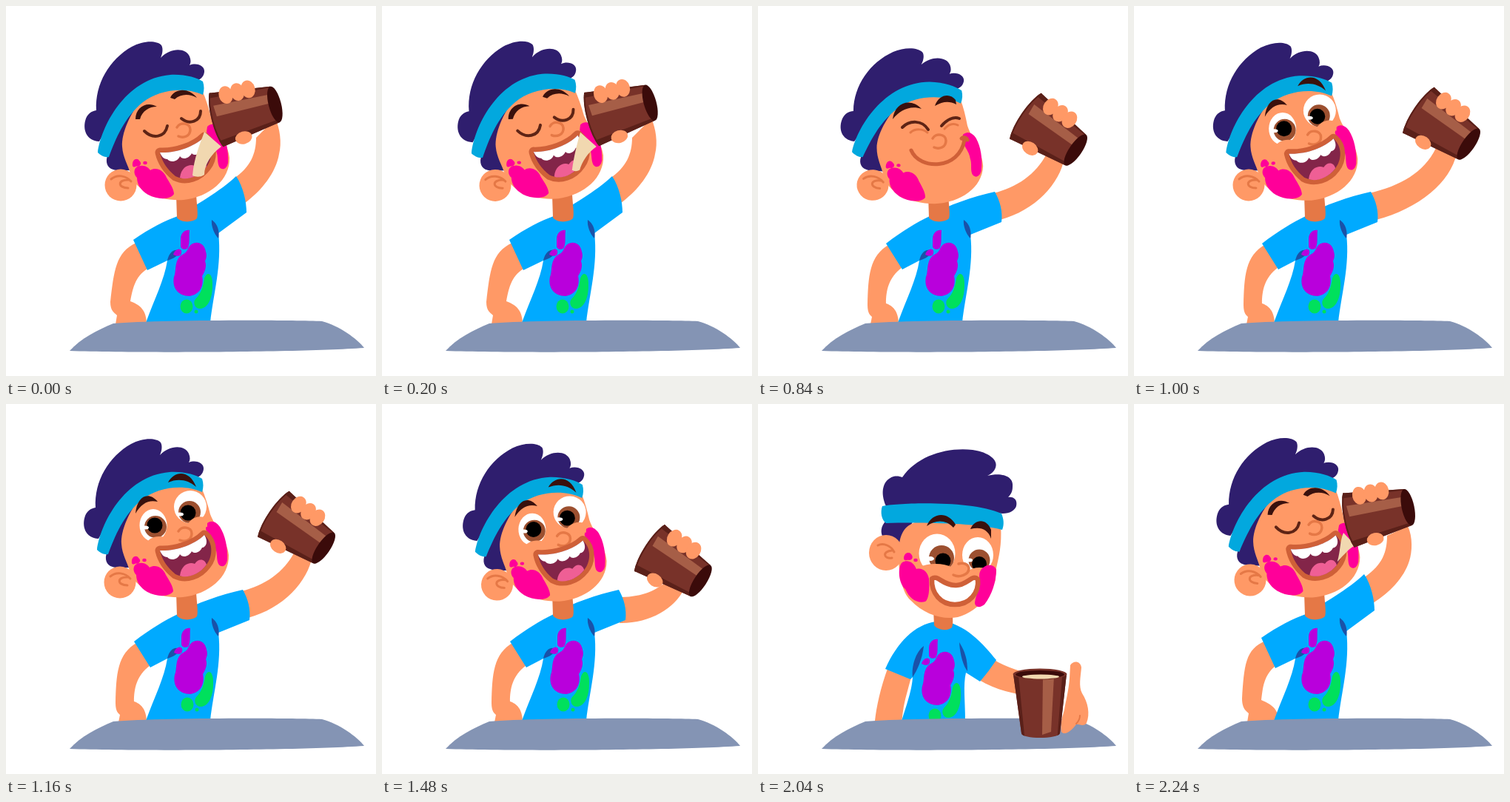
Animation, 500 px wide and 500 px high, one loop 2280 ms. Source, as an HTML page with a canvas:

```html
<!DOCTYPE html>
<html lang="en">
<head>
<meta charset="utf-8">
<title>Drinking boy</title>
<style>
html, body { margin: 0; width: 100%; height: 100%; overflow: hidden; background: #fff; }
canvas { display: block; width: 100vw; height: 100vh; }
</style>
</head>
<body>
<canvas id="stage"></canvas>
<script>
const LOOP = 2280;
const C = {
  skin: '#ff9966', shade: '#e57846', lip: '#cf6038', hair: '#2f1e6e', band: '#02a8de',
  shirt: '#00aaff', fold: '#1a52a8', purple: '#b900dc', green: '#00e05c', pink: '#ff0099',
  table: '#8494b4', cup: '#783229', cupLight: '#a65e47', cupDark: '#5a2019', hole: '#3b0b0a',
  milk: '#f1d8b0', brow: '#3a110d', lash: '#5e2415', iris: '#9c5030', mouth: '#832549', tongue: '#ef5f95'
};

const canvas = document.getElementById('stage');
const ctx = canvas.getContext('2d');
const dpr = window.devicePixelRatio || 1;
canvas.width = canvas.height = 500 * dpr;

function fill(color, d) {
  ctx.fillStyle = color;
  ctx.fill(new Path2D(d));
}
function line(color, width, d) {
  ctx.strokeStyle = color;
  ctx.lineWidth = width;
  ctx.lineCap = ctx.lineJoin = 'round';
  ctx.stroke(new Path2D(d));
}
function dot(color, x, y, rx, ry = rx) {
  ctx.fillStyle = color;
  ctx.beginPath();
  ctx.ellipse(x, y, rx, ry, 0, 0, Math.PI * 2);
  ctx.fill();
}
function local(draw) {
  ctx.save();
  draw();
  ctx.restore();
}

// Body poses. Paths of one kind share their structure, so they can be blended.
const drink = {
  tilt: true, head: [0, 0, 0, 1], gaze: [0, 0], cup: [282, 154, -104.5], blot: [0, 0],
  shirt: 'M172,316 C195,300 215,290 232,284 C255,270 290,250 311,230 C321,245 325,265 325,279 L287,307 C292,350 280,390 276,428 L189,428 C201,395 214,370 218,344 L191,357Z',
  armL: 'M176,320 C148,333 146,358 141,400 C141,412 146,414 150,418 L148,430 L190,430 C190,412 182,404 168,399 C171,383 174,366 191,355Z',
  armR: 'M308,233 C330,218 338,200 338,178 L364,152 C370,165 373,185 369,200 C365,225 345,250 323,266Z',
  neck: 'M230,255 L257,255 C258,270 260,282 258,287 C252,293 236,293 231,286Z',
  foldL: 'M218,344 C220,334 226,329 231,330 C236,333 232,340 218,344Z',
  foldR: 'M278,289 C277,297 281,308 287,314 C289,305 286,294 278,289Z',
  milk: 'M268,170 L291,190 C277,200 268,215 268,228 C262,232 256,231 252,229 C254,205 262,187 268,170Z'
};
const sip = {
  ...drink, head: [2, -4, 2.3, 1], cup: [288, 157, -102],
  armL: 'M178,320 C150,331 149,354 146,398 C146,412 152,415 155,418 L153,430 L195,430 C196,412 186,406 172,400 C174,384 175,367 191,354Z',
  armR: 'M309,236 C332,220 342,205 342,178 L370,165 C377,180 376,200 372,212 C365,235 345,255 323,269Z',
  milk: 'M283,174 L299,191 C291,195 283,204 275,213 C275,213 275,213 275,212 C279,199 278,186 283,174Z'
};
const back = {
  ...drink, head: [-5, 1, -3.5, 1], cup: [280, 152, -107],
  milk: 'M268,172 L288,190 C280,195 273,204 266,212 C265,212 265,212 264,211 C268,198 266,185 268,172Z'
};
const lazy = {
  ...drink, head: [-2, 2, -1, 1], cup: [315, 157, -81], milk: null,
  shirt: 'M172,318 C195,301 215,291 232,284 C258,268 290,252 314,238 C323,252 328,270 328,285 L287,308 C292,350 280,390 276,428 L189,428 C201,395 214,370 218,344 L192,356Z',
  armL: 'M178,322 C150,333 150,358 146,402 C144,414 150,416 153,420 L150,430 L190,430 C190,412 182,406 172,400 C174,382 175,366 192,354Z',
  armR: 'M312,241 C335,228 350,212 358,193 L390,190 C388,215 370,245 326,271Z'
};
const cheer = {
  ...lazy, head: [0, 0, 4, .97], cup: [360, 147, -55.5],
  shirt: 'M173,321 C195,304 215,292 232,284 C258,268 290,258 320,251 C327,263 331,278 329,292 L287,309 C292,350 280,390 276,428 L189,428 C201,395 214,370 218,344 L195,356Z',
  armL: 'M178,322 C150,337 149,366 148,404 C148,416 152,418 154,420 L152,430 L190,430 C190,412 182,405 173,402 C173,385 176,367 195,353Z',
  armR: 'M318,253 C350,245 375,228 390,200 L414,205 C408,240 375,276 327,289Z'
};
const settle = { ...cheer, head: [-1, 1, 3, .98] };
const dip = { ...cheer, head: [0, 4, 5, .95] };
const raise = {
  ...cheer, head: [0, 0, .5, .995], cup: [383, 139, -55.5],
  armR: 'M318,253 C360,243 392,225 408,192 L436,199 C428,238 385,274 327,289Z'
};
const wow = { ...cheer, head: [-1, -1, 0, 1], blot: [1, 0] };
const toss = {
  ...wow, head: [4, 10, 6, .97], cup: [360, 300, -60],
  armR: 'M312,280 C335,300 355,318 378,325 L395,355 C365,362 330,345 308,312Z'
};
const up = {
  tilt: false, head: [-22.5, 3, -5, 1], gaze: [6, 1], cup: null, blot: [-12, 18],
  shirt: 'M168,365 C180,322 200,300 233,298 C270,296 298,335 307,353 C297,361 286,368 276,375 L276,375 C275,385 277,405 279,428 L187,428 C188,405 191,385 194,373 L194,374Z',
  armL: 'M172,360 C162,385 156,405 154,428 C154,428 154,430 154,430 L154,430 L187,430 C188,425 188,420 188,415 C189,400 192,385 195,371Z',
  armR: 'M303,354 C320,378 333,402 348,428 L301,430 C290,410 280,392 276,372Z',
  neck: 'M222,280 L253,284 C251,294 249,299 248,304 C243,311 228,311 223,303Z',
  foldL: 'M210,330 C197,345 194,362 196,373 C204,360 209,345 210,330Z',
  foldR: 'M260,326 C262,350 266,368 269,374 C271,355 266,335 260,326Z'
};
const fling = { ...up, cup: [108, 315, -270] };
const grab = {
  tilt: false, head: [0, 0, 0, 1], gaze: [0, 0], cup: [381, 365, 0], blot: [-5, 15],
  shirt: 'M172,358 C188,322 212,298 240,294 C275,290 305,325 322,346 C315,356 308,366 300,375 L281,363 C277,380 280,400 280,428 L194,428 C203,400 208,385 209,369 L206,372Z',
  armL: 'M176,355 C165,385 160,410 158,428 C158,428 158,430 158,430 L158,430 L194,430 C195,425 195,420 196,415 C198,400 203,385 207,369Z',
  armR: 'M318,345 C335,356 358,363 385,368 L405,385 C380,400 335,394 299,373Z',
  neck: 'M237,278 L263,282 C263,292 264,297 262,302 C257,307 243,306 238,299Z',
  foldL: 'M224,327 C213,335 207,355 209,369 C215,360 222,345 224,327Z',
  foldR: 'M272,322 C273,340 278,355 283,361 C283,345 280,335 272,322Z'
};
const reach = {
  ...grab, head: [5, 0, 1, 1], cup: [411, 365, 0],
  armR: 'M318,345 C345,356 378,363 415,368 L430,385 C400,400 340,394 299,373Z'
};

// start time, pose, next pose, blend, face
const steps = [
  [0, drink, drink, 0, 'drink'],
  [80, drink, back, .15, 'drink'],
  [160, drink, back, .4, 'drink'],
  [240, drink, back, .75, 'drink'],
  [320, drink, back, 1, 'drink'],
  [360, back, lazy, .45, 'lazy'],
  [440, lazy, lazy, 0, 'lazy'],
  [480, lazy, cheer, .4, 'lazy'],
  [560, lazy, cheer, .85, 'happy'],
  [600, settle, settle, 0, 'happy'],
  [840, cheer, cheer, 0, 'happy'],
  [880, dip, dip, 0, 'happy'],
  [960, dip, raise, .7, 'wow'],
  [1000, raise, raise, 0, 'wow'],
  [1040, raise, wow, .4, 'wow'],
  [1120, raise, wow, .85, 'wow'],
  [1160, wow, wow, 0, 'wow'],
  [1480, wow, toss, .3, 'wow'],
  [1560, toss, toss, 0, 'wow'],
  [1600, toss, fling, 1, 'grin'],
  [1680, up, up, 0, 'grin'],
  [1720, up, reach, .2, 'grin'],
  [1800, up, reach, .65, 'grin'],
  [1880, up, reach, .92, 'grin'],
  [1920, reach, reach, 0, 'grin'],
  [2040, grab, grab, 0, 'grin'],
  [2080, grab, sip, .3, 'grin'],
  [2160, grab, sip, .78, 'drink'],
  [2240, sip, sip, 0, 'drink']
];

function blend(a, b, k) {
  if (!a || !b) return k < .5 ? a : b;
  if (Array.isArray(a)) return a.map((v, i) => v + (b[i] - v) * k);
  const ends = b.match(/[\d.]+/g);
  let i = 0;
  return a.replace(/[\d.]+/g, v => +v + (ends[i++] - v) * k);
}

function blendPose(a, b, k) {
  const pose = { tilt: (k < .5 ? a : b).tilt };
  for (const key of ['cup', 'gaze', 'blot', 'shirt', 'armL', 'armR', 'neck', 'foldL', 'foldR', 'milk'])
    pose[key] = blend(a[key], b[key], k);
  pose.head = a.tilt === b.tilt ? blend(a.head, b.head, k) : (k < .5 ? a : b).head;
  return pose;
}

function headMatrix({ head: [x, y, r, sy], tilt }) {
  const [px, py] = tilt ? [155, 242] : [250, 190];
  return new DOMMatrix().translate(px + x, py + y).rotate(r).scale(1, sy).translate(-px, -py);
}

function body(p) {
  fill(C.skin, p.armL);
  fill(C.skin, p.armR);
  fill(C.shirt, p.shirt);
  fill(C.fold, p.foldL);
  fill(C.fold, p.foldR);
  local(() => {
    ctx.translate(...p.blot);
    fill(C.green, 'M268,368 C272,357 280,362 279,378 C279,395 273,408 263,409 C255,410 252,400 256,396 C264,388 266,380 268,368Z');
    dot(C.green, 244, 406, 8.5, 9.5);
    dot(C.green, 257, 413, 2.5);
    fill(C.purple, 'M247,326 C253,316 268,318 270,332 C272,338 270,342 269,345 C272,352 268,360 265,365 C268,378 262,390 248,392 C232,392 224,380 227,366 C231,358 226,342 240,335 C244,333 245,330 247,326Z');
    fill(C.purple, 'M236,314 C237,305 243,302 248,303 C247,312 249,322 245,328 C240,330 236,328 236,324Z');
    fill(C.purple, 'M226,336 C228,329 235,326 237,331 C238,337 234,340 226,336Z');
  });
  fill(C.shade, p.neck);
}

function tiltedHead() {
  fill(C.hair, 'M126,183 C108,182 103,166 108,152 C111,145 116,142 122,141 C120,105 140,72 170,55 C185,47 203,46 210,53 C213,58 211,66 209,70 C222,56 243,56 248,68 C250,73 250,77 248,80 C258,76 269,81 268,89 C267,97 262,99 256,102 C220,100 170,110 126,183Z');
  fill(C.hair, 'M139,198 C134,207 135,216 142,220 C152,224 160,222 172,222 L195,122 L150,160Z');
  fill(C.skin, 'M186,122 C167,146 156,172 157,190 C158,205 165,215 168,226 C175,250 205,264 240,262 C275,258 303,235 302,205 C300,185 285,170 277,150 C274,138 270,125 265,114 C240,106 205,110 186,122Z');
  fill(C.band, 'M124,198 C128,165 160,98 222,93 C242,92 258,97 266,102 C268,108 268,114 266,120 C240,108 205,114 185,130 C160,150 148,180 139,204 C134,205 128,202 124,198Z');
  dot(C.skin, 155, 242, 21.5);
  line(C.shade, 3, 'M142,234 C150,227 162,229 169,237');
  line(C.shade, 3, 'M166,235 C150,234 151,246 165,246');
  fill(C.pink, 'M176,218 C184,213 192,217 195,222 C203,217 213,222 217,232 C222,240 227,248 227,254 C222,262 205,262 192,255 C182,249 177,241 177,232 C173,228 172,222 176,218Z');
  fill(C.pink, 'M171,216 C170,206 178,205 180,209 C184,212 182,216 178,217 C176,215 173,220 171,216Z');
  dot(C.pink, 188, 212, 2.7, 2.2);
  fill(C.pink, 'M272,163 C278,157 285,160 290,167 C297,178 301,195 300,212 C298,222 291,222 288,217 C285,210 287,203 284,196 C282,185 273,178 271,170Z');
}

function uprightHead() {
  fill(C.hair, 'M173,138 C165,120 168,103 183,98 C188,97 192,98 195,99 C215,70 255,58 290,62 C312,65 325,76 321,86 C319,92 314,95 310,97 C330,92 346,98 344,112 C344,119 341,123 338,126 C346,125 351,130 349,138 C347,144 340,148 331,148Z');
  fill(C.hair, 'M174,157 C165,165 165,175 170,182 C180,190 186,192 192,210 L200,180 L215,145 L185,145Z');
  fill(C.skin, 'M212,160 C195,166 190,180 190,205 C190,230 195,255 206,265 C225,285 250,292 270,288 C300,280 322,250 322,222 C325,208 330,190 328,165 L290,150 L225,150Z');
  fill(C.band, 'M168,138 C190,133 290,130 329,148 C332,155 333,163 330,170 C290,160 215,160 173,161 C167,157 165,146 168,138Z');
  dot(C.skin, 173, 201, 23, 24);
  line(C.shade, 3, 'M162,191 C170,187 180,192 184,200');
  line(C.shade, 3, 'M181,198 C167,199 170,210 181,208');
}

function nose(x, y) {
  line(C.shade, 3.5, `M${x - 9},${y - 3} C${x - 5},${y - 11} ${x + 9},${y - 9} ${x + 9},${y} C${x + 9},${y + 9} ${x},${y + 12} ${x - 7},${y + 9}`);
}

function eye(x, y, rx, ry, ix, iy, ir, px, py, pr) {
  dot('#fff', x, y, rx, ry);
  dot(C.iris, ix, iy, ir);
  dot('#000', px, py, pr);
}

function openMouth() {
  const shape = 'M208,198 C230,199 255,190 268,177 C281,188 279,207 271,217 C261,231 243,237 229,230 C218,221 211,211 208,198Z';
  line(C.lip, 13, shape);
  fill(C.mouth, shape);
  fill(C.tongue, 'M235,232 C237,216 249,213 255,216 C261,207 269,210 271,217 C261,231 244,236 235,232Z');
  fill('#fff', 'M208,198 C230,199 255,190 268,177 C274,186 270,194 265,194 C262,201 254,203 251,199 C247,207 238,208 235,203 C232,211 222,212 218,207 C213,207 210,203 208,198Z');
}

const faces = {
  drink: { ref: drink, draw() {
    nose(240, 167);
    line(C.lash, 4, 'M187,169 C198,180 215,178 218,162');
    line(C.lash, 4, 'M237,152 C248,161 263,156 263,142');
    fill(C.brow, 'M175,153 C175,137 190,128 204,136 C193,136 184,142 181,153Z');
    fill(C.brow, 'M222,124 C228,111 247,110 258,124 C247,118 236,119 228,126Z');
    openMouth();
  } },
  lazy: { ref: lazy, draw() {
    eye(198, 168, 20, 19, 204, 161, 12, 200, 161, 8.5);
    eye(250, 148, 18, 15, 250, 147, 12, 248, 143, 9);
    fill(C.skin, 'M172,168 L220,151 L214,136 L176,146Z');
    fill(C.skin, 'M228,148 L268,136 L262,122 L232,132Z');
    fill(C.skin, 'M188,190 C194,178 212,176 222,180 L222,192Z');
    line(C.brow, 3, 'M184,163 L214,152');
    line(C.brow, 3, 'M233,146 L264,137');
    nose(238, 174);
    fill(C.brow, 'M173,151 C172,133 188,122 201,131 C189,132 180,138 173,151Z');
    fill(C.brow, 'M221,123 C228,107 245,103 256,118 C245,113 232,114 221,123Z');
    const shape = 'M212,205 C233,205 257,198 274,184 C279,201 271,219 254,225 C235,231 217,224 212,205Z';
    line(C.lip, 11, shape);
    fill(C.mouth, shape);
    fill('#fff', 'M212,205 C233,205 257,198 274,184 C276,192 272,198 267,198 C265,207 257,208 253,205 C250,213 241,214 237,209 C234,217 225,218 222,214 C216,215 213,210 212,205Z');
  } },
  happy: { ref: cheer, draw() {
    line(C.lash, 4, 'M195,164 C205,154 222,154 230,167');
    line(C.shade, 3, 'M206,171 C213,165 223,166 229,171');
    line(C.lash, 4, 'M248,162 C255,154 264,149 272,152');
    line(C.shade, 3, 'M252,166 C258,159 264,158 270,161');
    nose(245, 182);
    fill(C.brow, 'M182,153 C185,129 207,124 221,139 C205,134 192,141 182,153Z');
    fill(C.brow, 'M239,135 C244,119 260,117 267,127 L268,133 C258,128 250,129 239,135Z');
    line(C.lip, 5, 'M207,195 C218,222 272,222 279,181');
    line(C.lip, 5, 'M275,179 C278,176 282,178 283,181');
  } },
  wow: { ref: wow, draw() {
    eye(199, 164, 18.5, 22, 202, 166, 15, 201, 164, 10.5);
    eye(249, 139, 22, 22, 248, 146, 15, 246, 147, 10.5);
    dot('#fff', 188, 167, 5, 2.5);
    dot('#fff', 235, 149, 5, 2.5);
    fill(C.skin, 'M188,192 C192,177 212,176 222,184 L220,194Z');
    fill(C.skin, 'M244,166 C248,153 264,148 272,156 L272,166Z');
    nose(242, 175);
    fill(C.brow, 'M175,148 C177,125 192,117 205,132 C193,129 183,134 175,148Z');
    fill(C.brow, 'M219,106 C227,90 248,88 257,112 C246,102 232,100 219,106Z');
    openMouth();
  } },
  grin: { ref: grab, draw([gx, gy]) {
    eye(242, 202, 24.5, 26.5, 248 + gx, 208 + gy, 17, 250 + gx, 212 + gy, 10.5);
    eye(297, 204, 21, 24, 299 + gx, 211 + gy, 14.5, 299 + gx, 216 + gy, 10);
    dot('#fff', 233 + gx, 209 + gy, 5, 3);
    dot('#fff', 286 + gx, 211 + gy, 4, 2.5);
    dot(C.skin, 240, 232, 32, 16);
    dot(C.skin, 299, 236, 22, 15);
    dot(C.skin, 275, 223, 11, 9);
    line(C.shade, 3.5, 'M264,231 C272,235 285,231 285,222 C284,216 277,214 271,216');
    fill(C.pink, 'M195,214 C202,210 210,213 214,223 C222,221 229,226 231,236 C232,250 231,264 226,267 C216,270 205,264 199,250 C190,243 188,220 195,214Z');
    fill(C.pink, 'M197,209 C197,201 204,199 207,203 C210,206 209,211 204,211 C201,210 198,213 197,209Z');
    dot(C.pink, 213, 211, 2.7, 2.2);
    fill(C.pink, 'M303,222 C310,215 320,217 322,224 C322,240 316,258 306,271 C300,276 293,275 293,268 C295,255 300,250 300,240 C298,232 299,226 303,222Z');
    const shape = 'M235,236 C243,230 250,246 268,245 C283,245 290,229 297,237 C299,255 286,271 266,271 C247,271 234,256 235,236Z';
    fill('#fff', shape);
    line(C.lip, 6.5, shape);
    fill(C.brow, 'M228,165 C235,147 256,144 267,163 L264,167 C254,156 240,156 228,165Z');
    fill(C.brow, 'M287,169 C293,155 309,154 315,170 L315,182 C310,168 300,166 287,169Z');
  } }
};

function head(pose, name) {
  const m = headMatrix(pose);
  const face = faces[name];
  local(() => {
    ctx.transform(m.a, m.b, m.c, m.d, m.e, m.f);
    pose.tilt ? tiltedHead() : uprightHead();
    const r = headMatrix(face.ref).inverse();
    ctx.transform(r.a, r.b, r.c, r.d, r.e, r.f);
    face.draw(pose.gaze);
  });
}

function cupBody(d) {
  const shape = new Path2D(d);
  ctx.fillStyle = C.cup;
  ctx.fill(shape);
  local(() => {
    ctx.clip(shape);
    fill(C.cupDark, 'M-40,-8 L-30,-8 L-20,92 L-40,92Z');
    fill(C.cupLight, 'M4,4 L19,3 L15,78 L3,82Z');
    fill(C.cupDark, 'M31,-8 L40,-8 L40,92 L23,92Z');
  });
}

function cup([x, y, rot]) {
  local(() => {
    ctx.translate(x, y);
    ctx.rotate(rot * Math.PI / 180);
    if (rot > -40) {
      fill(C.skin, 'M41,-12 C45,-19 55,-18 56,-9 C55,4 52,16 57,26 C65,38 68,54 63,66 C59,72 52,67 49,68 C43,76 34,84 29,78 C27,66 31,56 33,48 C35,36 39,21 40,6Z');
      line(C.shade, 2, 'M49,67 C53,63 54,60 54,56');
      cupBody('M-36,0 L-25,80 C-24,88 24,88 27,80 L36,0Z');
      dot(C.cup, 0, 0, 36.5, 7.5);
      dot(C.hole, 0, .5, 33, 5.5);
      dot(C.milk, 1, 3.5, 25, 3);
      return;
    }
    cupBody('M-38,2 C-20,-6 20,-6 37,2 L25,84 L-25,84Z');
    line(C.cupDark, 2, 'M-37,3 C-20,-5 20,-5 36,3');
    dot(C.hole, 0, 84, 25, 8.5);
    if (rot < -150) return;
    for (const fy of [23, 39, 54]) dot(C.skin, 29, fy, 12, 9.5);
    dot(C.skin, -33, 32, 8.5, 11.5);
  });
}

function render(now) {
  const t = now % LOOP;
  const [, a, b, k, face] = steps.findLast(s => s[0] <= t);
  const pose = blendPose(a, b, k);
  ctx.setTransform(dpr, 0, 0, dpr, 0, 0);
  ctx.fillStyle = '#fff';
  ctx.fillRect(0, 0, 500, 500);
  body(pose);
  fill(C.table, 'M86,466 C100,450 125,437 145,429 C200,424 380,424 427,426 C450,432 475,450 484,462 C400,468 180,469 86,466Z');
  head(pose, face);
  if (pose.milk && face === 'drink') fill(C.milk, pose.milk);
  if (pose.cup) cup(pose.cup);
}

const start = performance.now();
function tick() {
  render(performance.now() - start);
  requestAnimationFrame(tick);
}
tick();
</script>
</body>
</html>
```
